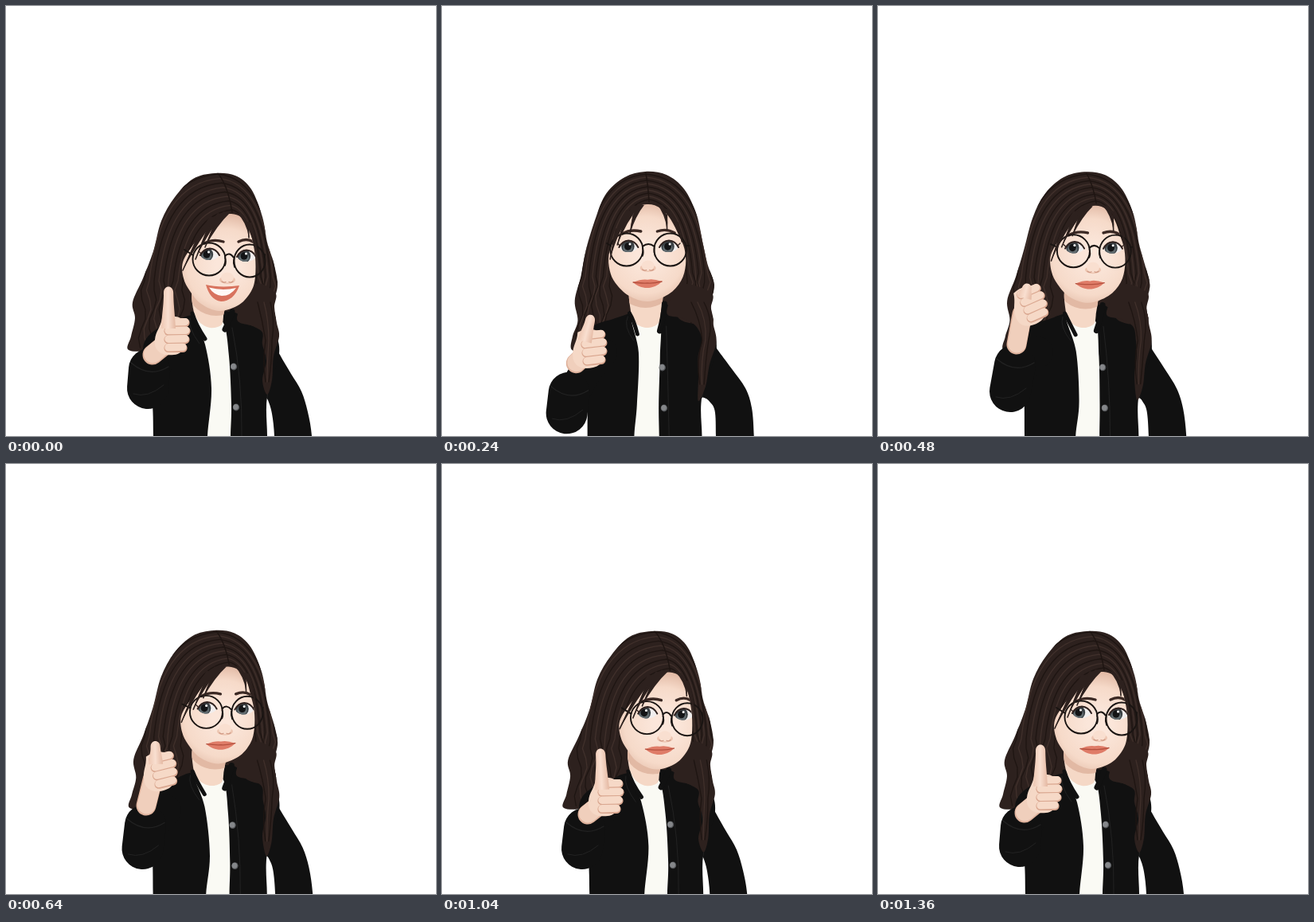
Animation, 540 px wide and 540 px high, one loop 1440 ms. Source, as an HTML page with a canvas:

```html
<!DOCTYPE html>
<html lang="en">
<head>
<meta charset="utf-8">
<title>Thumbs up</title>
<style>
html, body { margin: 0; width: 100%; height: 100%; overflow: hidden; background: #fff; }
canvas { display: block; width: 540px; height: 540px; }
</style>
</head>
<body>
<canvas id="stage" width="540" height="540"></canvas>
<script>
const c = document.getElementById('stage').getContext('2d');
const LOOP = 1440, STEP = 80;
const HAIR = '#2d211e', HAIR_LIGHT = '#40302b', HAIR_DARK = '#1e1512';
const SKIN = '#f5d8c6', SHADE = '#dfb29c', CLOTH = '#111', FOLD = '#222';

// time, yaw, pitch, elbow, cuff, forearm base, fist, thumb tip, fist angle
const POSES = [
  [80, 0, 0, 156, 534, 155, 515, 157, 490, 184, 473, 183, 424, 0],
  [320, .34, 0, 157, 500, 162, 471, 174, 428, 186, 406, 188, 378, -.15],
  [480, .68, .15, 166, 484, 172, 451, 174, 425, 190, 374, 187, 354, -.4],
  [800, 1.08, .75, 177, 482, 178, 456, 178, 433, 196, 394, 188, 353, -.05],
  [1040, 1.08, 1.05, 176, 483, 179, 458, 183, 440, 206, 416, 199, 363, 0],
  [1360, 1, 1, 178, 480, 180, 456, 184, 438, 209, 412, 204, 358, 0]
];

// Outlines as [facing front, turned]
const BACK = [
  [253,208, 280,212, 303,230, 319,262, 328,300, 333,325, 342,350, 338,375, 341,398, 330,420, 250,420,
   185,432, 166,432, 166,415, 173,395, 169,370, 175,340, 180,305, 193,265, 205,235, 228,215],
  [262,210, 288,213, 308,230, 322,265, 328,297, 336,322, 341,350, 336,375, 339,400, 330,420, 250,420,
   185,432, 154,432, 157,415, 162,392, 159,372, 172,342, 185,308, 195,270, 212,240, 235,217]];
const LOCK = [
  [296,350, 338,360, 338,380, 341,400, 345,422, 336,450, 330,478, 320,496, 322,465, 320,440, 328,420, 318,402, 300,392, 280,385],
  [312,350, 338,360, 337,378, 340,398, 343,415, 336,440, 334,470, 328,488, 322,470, 327,445, 322,425, 322,410, 310,402, 290,392]];
const FACE = [
  [252,249, 268,254, 282,268, 294,288, 302,305, 304,325, 298,345, 282,362, 256,371, 232,364, 214,348, 207,332, 206,312, 212,292, 222,272, 234,254],
  [283,261, 297,266, 305,278, 309,292, 313,315, 313,340, 308,358, 293,375, 268,383, 245,374, 231,358, 223,342, 222,322, 235,300, 252,280, 268,264]];
const TORSO = [
  [237,386, 215,393, 190,402, 170,425, 181,470, 182,540, 182,580, 326,580, 326,540, 326,490, 345,432, 335,405, 300,395, 278,374],
  [234,388, 215,395, 190,405, 172,430, 183,490, 185,540, 185,580, 328,580, 328,540, 328,490, 343,437, 335,410, 305,400, 284,384]];
const ARM = [
  [335,415, 346,431, 365,455, 384,480, 392,505, 394,540, 394,580, 346,580, 346,540, 345,508, 336,495, 320,480],
  [333,415, 344,438, 358,462, 371,484, 379,510, 384,540, 385,580, 337,580, 337,540, 334,512, 329,495, 320,475]];
const TEE = [
  [239,392, 256,395, 274,396, 272,440, 269,500, 270,540, 270,580, 238,580, 238,540, 241,500, 246,435],
  [235,386, 254,395, 273,398, 280,440, 283,500, 282,540, 282,580, 253,580, 253,540, 258,480, 250,425]];
const NECK = [
  [238,350, 238,385, 243,398, 256,404, 270,400, 275,388, 275,350],
  [237,355, 235,380, 242,396, 256,404, 270,401, 273,390, 274,360]];
const WISPS = [
  [[242,250, 234,262, 232,286], [277,260, 262,274, 250,303]],
  [[236,252, 222,268, 215,300], [270,262, 255,275, 238,318]],
  [[228,258, 212,280, 208,318], [260,266, 240,292, 222,332]],
  [[267,250, 276,262, 276,281], [294,262, 304,272, 305,291]],
  [[276,256, 292,272, 297,296], [304,272, 312,292, 316,315]]
];

let yaw = 0, pitch = 0;
const lerp = (a, b, k) => a + (b - a) * k;
const mix = ([a, b]) => a.map((n, i) => lerp(n, b[i], i % 2 ? pitch : yaw));
const at = (ax, ay, bx, by) => mix([[ax, ay], [bx, by]]);

// Closed smooth curve through the points
function outline(shape) {
  const p = mix(shape), n = p.length / 2;
  const pt = i => { const k = (i + n) % n * 2; return [p[k], p[k + 1]]; };
  c.beginPath();
  c.moveTo(p[0], p[1]);
  for (let i = 0; i < n; i++) {
    const [a, b, d, e] = [pt(i - 1), pt(i), pt(i + 1), pt(i + 2)];
    c.bezierCurveTo(b[0] + (d[0] - a[0]) / 6, b[1] + (d[1] - a[1]) / 6,
      d[0] - (e[0] - b[0]) / 6, d[1] - (e[1] - b[1]) / 6, d[0], d[1]);
  }
  c.closePath();
}

function fill(shape, color) {
  outline(shape);
  c.fillStyle = color;
  c.fill();
}

function oval(x, y, rx, ry, color) {
  c.beginPath();
  c.ellipse(x, y, rx, ry, 0, 0, 7);
  c.fillStyle = color;
  c.fill();
}

// Polyline for two points, quadratic curves for more
function line(p, width, color) {
  c.beginPath();
  c.moveTo(p[0], p[1]);
  if (p.length === 4) c.lineTo(p[2], p[3]);
  for (let i = 2; i + 3 < p.length; i += 4) c.quadraticCurveTo(p[i], p[i + 1], p[i + 2], p[i + 3]);
  c.lineWidth = width;
  c.strokeStyle = color;
  c.stroke();
}

function strands() {
  c.save();
  outline(BACK);
  c.clip();
  const [px, py] = at(253, 246, 284, 259);
  const [tx] = at(253, 0, 266, 0);
  for (let i = 0; i < 9; i++) {
    const k = i / 8, color = i % 2 ? HAIR_LIGHT : HAIR_DARK;
    const x = lerp(tx, px, k), y = lerp(211, py - 3, k);
    for (const s of [-1, 1]) {
      const [ex, ey] = s < 0 ? at(176 + i * 4, 340, 174 + i * 6, 345) : at(337 - i * 4, 335, 338 - i * 3, 340);
      c.beginPath();
      c.moveTo(x, y);
      c.bezierCurveTo(lerp(x, ex, .55), y + 4, lerp(x, ex, .9), lerp(y, ey, .35), ex, ey);
      for (let d = 1; d < 8; d++) c.lineTo(ex + s * 4 * Math.sin(d * 1.3 + i) + s * d * .6, ey + d * 12);
      c.lineWidth = 1.3;
      c.strokeStyle = color;
      c.stroke();
    }
  }
  line([tx, 210, lerp(tx, px, .7), 225, px, py], 1.5, HAIR_DARK);
  c.restore();
}

function body() {
  fill(ARM, CLOTH);
  fill(TORSO, CLOTH);
  fill(TEE, '#fafaf4');
  fill(NECK, SKIN);
  c.save();
  outline(NECK);
  c.clip();
  const [nx, ny] = at(253, 350, 264, 360);
  oval(nx, ny, 34, 29, '#e2b9a4');
  c.restore();
  line(mix([[236,386, 242,395, 244,412], [234,386, 238,400, 250,418]]), 5, CLOTH);
  line(mix([[278,374, 278,388, 273,408], [284,384, 282,392, 275,406]]), 7, CLOTH);
  line(mix([[281,402, 280,470, 282,540], [284,404, 297,470, 296,540]]), 1, FOLD);
  line(mix([[234,390, 227,402, 240,420], [231,392, 228,404, 243,424]]), 1, FOLD);
  line(mix([[326,432, 331,470, 326,492], [326,436, 332,470, 328,492]]), 1, FOLD);
  for (const [x, y] of [at(274, 454, 286, 453), at(276, 505, 289, 504)]) {
    oval(x, y, 4.2, 4.4, '#55575a');
    oval(x - .4, y - .4, 3.3, 3.5, '#85878a');
  }
  fill(LOCK, HAIR);
  for (let i = 0; i < 3; i++) {
    const x = 312 + i * 8;
    line(mix([[x, 372, x + 14, 395, 327 + i * 4, 420, 318 + i * 6, 445, 323 + i * 3, 475],
      [x + 4, 372, x + 10, 395, 326 + i * 4, 420, 322 + i * 6, 445, 326 + i * 2, 472]]),
      1.3, i % 2 ? HAIR_LIGHT : HAIR_DARK);
  }
}

function eye(x, y, ix, iy, side) {
  c.save();
  c.beginPath();
  c.moveTo(x - 12, y + 1);
  c.bezierCurveTo(x - 8, y - 11, x + 8, y - 11, x + 12, y + 1);
  c.bezierCurveTo(x + 7, y + 9, x - 8, y + 9, x - 12, y + 1);
  c.fillStyle = '#f1eeee';
  c.fill();
  c.clip();
  oval(ix, iy, 8.2, 8.5, '#3a4044');
  oval(ix, iy + 2, 6.2, 5.7, '#626c70');
  oval(ix, iy, 4.5, 4.7, '#131416');
  oval(ix + 2.5, iy - 3, 1.5, 1.5, '#fff');
  c.restore();
  line([x - 12, y + 1, x - 8, y - 7, x, y - 7.5, x + 8, y - 7, x + 12, y + 1], 2, '#30221f');
  line([x + side * 11, y - 1, x + side * 14, y - 4], 1.3, '#30221f');
}

function mouth(smile) {
  if (smile) {
    c.beginPath();
    c.moveTo(251, 350);
    c.bezierCurveTo(262, 353, 280, 353, 293, 351);
    c.bezierCurveTo(289, 364, 280, 371, 270, 371);
    c.bezierCurveTo(260, 370, 254, 361, 251, 350);
    c.fillStyle = '#d8735e';
    c.fill();
    c.beginPath();
    c.moveTo(255, 353.5);
    c.quadraticCurveTo(272, 358, 289, 354);
    c.quadraticCurveTo(282, 364, 271, 364);
    c.quadraticCurveTo(261, 363, 255, 353.5);
    c.fillStyle = '#fffaf6';
    c.fill();
    return;
  }
  const [x, y] = at(254, 347, 272, 357.5);
  c.beginPath();
  c.moveTo(x - 18, y);
  c.quadraticCurveTo(x - 7, y - 4.5, x, y - 3.2);
  c.quadraticCurveTo(x + 7, y - 5, x + 18, y - 1);
  c.bezierCurveTo(x + 9, y + 9, x - 8, y + 10, x - 18, y);
  c.fillStyle = '#df7c68';
  c.fill();
  line([x - 18, y, x - 6, y + 1.5, x, y + 1, x + 8, y + 1.5, x + 18, y - 1], 1.3, '#b5513f');
}

function face(smile) {
  const [nx, ny] = at(253, 326, 278, 341);
  const g = c.createRadialGradient(nx, ny - 15, 15, nx - 4, ny - 12, 70);
  g.addColorStop(0, '#fbe6da');
  g.addColorStop(.6, '#f6dac9');
  g.addColorStop(1, '#dfb6a1');
  fill(FACE, g);

  c.save();
  outline(FACE);
  c.clip();
  oval(nx, ny + 3, 10, 5, '#edc6b2');
  oval(nx, ny, 8, 6.5, '#f9dfd0');
  line([nx - 7, ny + 5, nx - 4, ny + 7, nx - 2, ny + 5.5], 1.2, '#cf9883');
  line([nx + 2, ny + 5.5, nx + 4, ny + 7, nx + 7, ny + 5], 1.2, '#cf9883');
  mouth(smile);
  eye(...at(228, 302, 256, 312), ...at(228, 302, 252, 312), -1);
  eye(...at(280, 302, 302, 314), ...at(279, 302, 299, 314), 1);
  line(mix([[220,286, 229,280, 243,283], [249,298, 260,292, 273,296]]), 3.4, '#3b2924');
  line(mix([[264,283, 276,279, 287,285], [292,296, 302,291, 310,296]]), 3.4, '#3b2924');
  c.restore();
}

function glasses() {
  const [lx, ly] = at(225, 306, 255, 318), [rx, ry] = at(281, 306, 306, 320);
  const ink = '#191412';
  c.lineWidth = 1.9;
  c.strokeStyle = ink;
  for (const [x, y, w] of [[lx, ly, 20.5], [rx, ry, lerp(20.5, 19.5, yaw)]]) {
    c.beginPath();
    c.ellipse(x, y, w, 20.5, 0, 0, 7);
    c.stroke();
  }
  const a = lx + 20, b = rx - 20;
  line([a, ly - 4, (a + b) / 2, ly - 10, b, ry - 4], 2, ink);
  line([a, ly - 2, a + 2, ly + 3, a, ly + 8], 1.6, ink);
  line([b, ry - 2, b - 1, ry + 3, b + 1, ry + 8], 1.6, ink);
  line([lx - 20, ly - 5, ...at(202, 298, 224, 306)], 2, ink);
  line([rx + 19, ry - 5, ...at(306, 301, 325, 312)], 2, ink);
}

function wisps() {
  for (const w of WISPS) {
    const [x, y, mx, my, ex, ey] = mix(w);
    c.beginPath();
    c.moveTo(x - 4, y - 2);
    c.quadraticCurveTo(mx - 2, my - 1, ex, ey);
    c.quadraticCurveTo(mx + 3, my + 1, x + 4, y);
    c.closePath();
    c.fillStyle = HAIR;
    c.fill();
    line([ex, ey, lerp(ex, mx, .5), lerp(ey, my, .5), mx, my], 1.6, HAIR);
  }
}

function hand([ex, ey, cx, cy, bx, by, fx, fy, tx, ty, turn]) {
  line([200, 435, lerp(200, ex, .5) - 8, lerp(435, ey, .4), ex, ey], 40, CLOTH);
  line([ex, ey, cx, cy], 52, CLOTH);
  line([cx - 23, cy - 8, cx, cy + 12, cx + 24, cy - 3], 1.2, FOLD);
  line([ex - 18, ey + 7, ex, ey + 13, ex + 20, ey - 4], 1, FOLD);

  line([bx, by, fx - 9, fy + 13], 25, SHADE);
  line([bx + .5, by - 1, fx - 8, fy + 11], 23, '#f0cfbc');

  c.save();
  c.translate(fx, fy);
  c.rotate(turn);
  c.beginPath();
  c.moveTo(-13, -20);
  c.bezierCurveTo(2, -25, 17, -22, 18, -8);
  c.bezierCurveTo(19, 10, 16, 25, 2, 26);
  c.bezierCurveTo(-12, 28, -24, 22, -22, 7);
  c.bezierCurveTo(-21, -4, -15, -8, -13, -20);
  c.fillStyle = SKIN;
  c.fill();
  [16, 17, 16, 13].forEach((w, i) => {
    const y = -15 + i * 10.6;
    line([-5, y + .7, w, y + .7], 11.2, '#d9a68f');
    line([-5, y, w, y - .4], 9.4, '#f6d9c7');
  });
  c.restore();

  // Tapered thumb
  const dx = fx - 5 - tx, dy = fy - 12 - ty, len = Math.hypot(dx, dy);
  c.save();
  c.translate(tx, ty);
  c.rotate(Math.atan2(dy, dx) - Math.PI / 2);
  c.beginPath();
  c.moveTo(-9, len + 5);
  c.bezierCurveTo(-8, len * .6, -6, len * .5, -6, 2);
  c.bezierCurveTo(-6, -8, 6, -8, 6.2, 2);
  c.bezierCurveTo(6.5, len * .5, 8, len * .6, 9, len + 5);
  const g = c.createLinearGradient(-8, 0, 9, 0);
  g.addColorStop(0, '#efcab6');
  g.addColorStop(.45, '#f9dfd0');
  g.addColorStop(1, '#e4b8a2');
  c.fillStyle = g;
  c.fill();
  c.restore();
}

function poseAt(t) {
  const last = POSES[POSES.length - 1];
  if (t < STEP) return last;
  const i = POSES.findIndex(p => p[0] >= t);
  if (i < 0) return last;
  if (i === 0) return POSES[0];
  const a = POSES[i - 1], b = POSES[i], k = (t - a[0]) / (b[0] - a[0]);
  return a.map((n, j) => lerp(n, b[j], k));
}

function draw(t) {
  const [, y, p, ...arm] = poseAt(t);
  yaw = y;
  pitch = p;
  c.fillStyle = '#fff';
  c.fillRect(0, 0, 540, 540);
  c.lineCap = c.lineJoin = 'round';
  fill(BACK, HAIR);
  strands();
  body();
  face(t < STEP);
  glasses();
  wisps();
  hand(arm);
}

const start = performance.now();
function tick() {
  const t = Math.max(0, performance.now() - start) % LOOP;
  draw(Math.floor(t / STEP) * STEP);
  requestAnimationFrame(tick);
}
tick();
</script>
</body>
</html>
```
